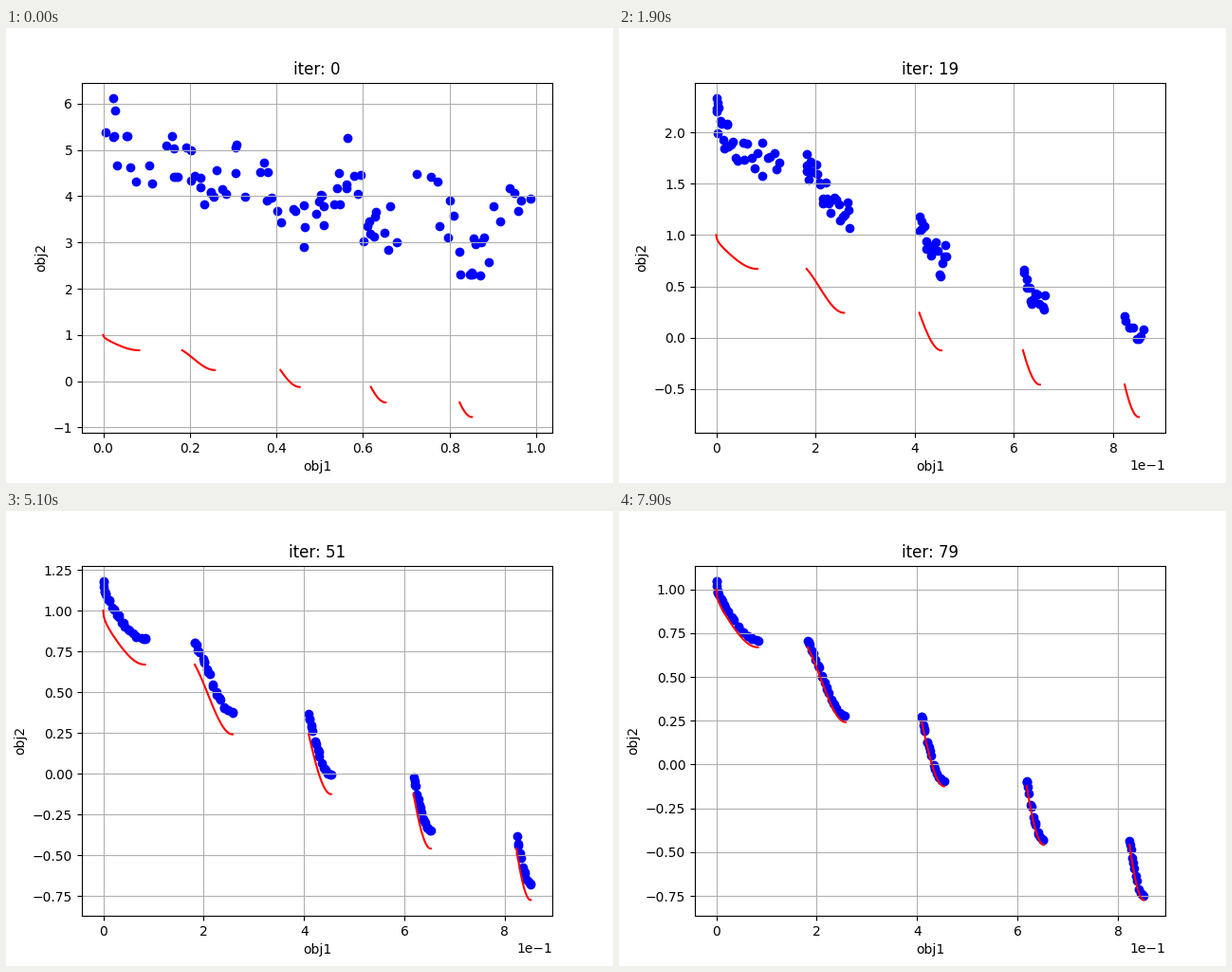
A matplotlib script that plays this animation: 640 px wide and 480 px high, repeating every 8 s.

```python
import numpy as np
import matplotlib.pyplot as plt
from matplotlib.animation import FuncAnimation

ITERS, STEP_MS = 80, 100
N = 100      # population size
SETTLE = 8   # iteration by which the starting population has died out
RENEW = 4    # iterations between changes of one individual

# Disconnected parts of the ZDT3 Pareto front.
FRONT = np.array([(0, 0.0830), (0.1822, 0.2577), (0.4093, 0.4538),
                  (0.6183, 0.6525), (0.8233, 0.8518)])

# Largest excess of g over its optimum of 1, at a few iterations.
EXCESS = [(0, 4.4), (8, 2.87), (19, 1.33), (29, 0.595),
          (40, 0.29), (62, 0.11), (79, 0.045)]

# Outer individuals of the starting population.
OUTER = [(0.005, 5.38), (0.023, 6.11), (0.027, 5.85), (0.565, 5.25),
         (0.870, 2.29), (0.988, 3.95)]

rng = np.random.default_rng(7)


def zdt3(x, g):
    return g - np.sqrt(x * g) - x * np.sin(10 * np.pi * x)


def zdt3_g(x, y):
    """Value of g for which zdt3(x, g) equals y."""
    c = y + x * np.sin(10 * np.pi * x)
    return ((np.sqrt(x) + np.sqrt(x + 4 * c)) / 2) ** 2


def first_population():
    """Random decision vectors of 30 variables, sorted by obj1."""
    x = rng.uniform(0.02, 0.97, N - len(OUTER))
    g = 1 + 9 * rng.random((len(x), 29)).mean(axis=1)
    y = np.clip(zdt3(x, g), 2.3, 5.3)
    pts = np.vstack([OUTER, np.column_stack([x, y])])
    return pts[np.argsort(pts[:, 0])]


START = first_population()
RANK = np.argsort(np.argsort(zdt3_g(*START.T)))
WHO = np.arange(N)
PHASE = rng.integers(0, RENEW, N)
EPOCHS = ITERS // RENEW + 2
SHIFT = rng.uniform(-0.008, 0.008, (N, EPOCHS))
NOISE = np.clip(rng.normal(0, 1, (N, EPOCHS)), -1.8, 1.8)


def spread(excess, epoch):
    """Place everyone along the five clusters; return obj1."""
    wide = min(1, excess)
    low, high = FRONT[:, 0], FRONT[:, 1] + 0.0103 * wide ** 2
    high[0] += 0.03 * excess * wide

    # Early on, the left clusters hold more of the population.
    tilt = 0.07 + min(0.1, 0.03 * excess)
    share = np.linspace(0.2 + tilt, 0.2 - tilt, len(FRONT))
    edges = np.cumsum(share) - share

    q = np.clip((WHO + 0.5) / N + SHIFT[WHO, epoch], 0, 0.9999)
    part = np.searchsorted(edges, q, side="right") - 1
    u = np.clip(1.1 * (q - edges[part]) / share[part] - 0.05, 0, 1)
    u **= np.where(part == 0, 1.7, 1.15)
    return low[part] + (high - low)[part] * u


def population(k):
    when, size = np.array(EXCESS).T
    excess = np.exp(np.interp(k, when, np.log(size)))
    wide = min(1, excess)
    epoch = (k + PHASE) // RENEW

    x = spread(excess, epoch)
    sigma = 0.04 + 0.04 * wide
    g = 1 + excess * (1 - 0.1 * wide + sigma * NOISE[WHO, epoch])
    g[0] = 1 + excess
    pts = np.column_stack([x, np.minimum(zdt3(x, g), 1 + excess)])

    # The worst of the starting population die out first.
    alive = RANK < N * max(0, 1 - k / SETTLE) ** 2
    pts[alive] = START[alive]
    return pts


fig, ax = plt.subplots(figsize=(6.4, 4.8), dpi=100)


def draw(k):
    ax.clear()
    ax.scatter(*population(k).T, color="blue")
    for a, b in FRONT:
        x = np.linspace(a, b, 100)
        ax.plot(x, zdt3(x, 1), color="red")
    ax.ticklabel_format(axis="x", style="sci", scilimits=(0, 0))
    ax.set(title=f"iter: {k}", xlabel="obj1", ylabel="obj2")
    ax.grid(True)


anim = FuncAnimation(fig, draw, frames=ITERS, interval=STEP_MS,
                     repeat=True, repeat_delay=0)
plt.show()
```
